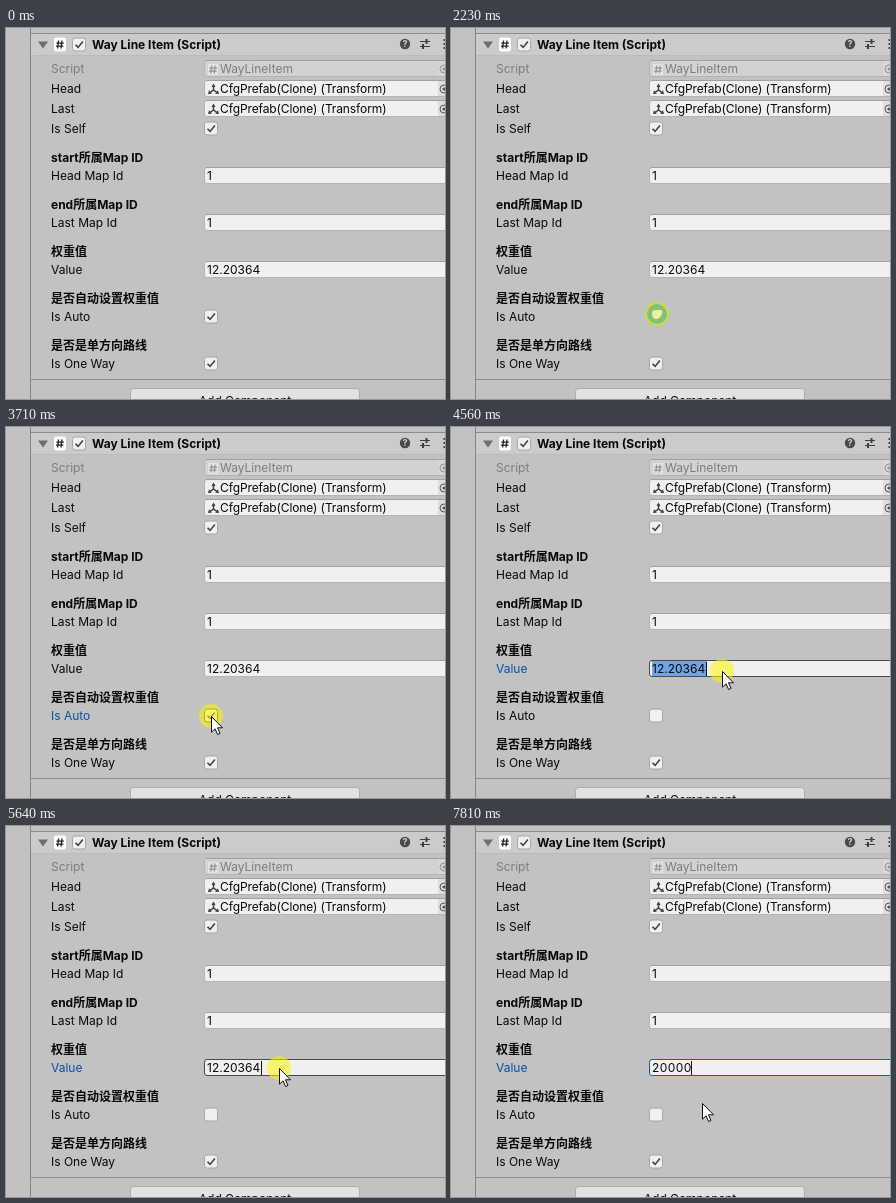
These frames come from a looping animation (439x371 px, 8000 ms). An HTML page:

```html
<!DOCTYPE html>
<html lang="en">
<head>
<meta charset="utf-8">
<title>Inspector</title>
<style>
html, body { margin: 0; width: 100%; height: 100%; overflow: hidden; background: #c2c2c2; }
svg { display: block; }
text { font: 12px Inter, "Noto Sans CJK SC", "Noto Sans CJK", sans-serif; fill: #090909; white-space: pre; }
.bold { font-weight: 700; }
.dim { fill: #7d7d7d; }
.focus { fill: #0b4ea2; }
.tight { letter-spacing: -.11px; }
</style>
</head>
<body>
<svg id="stage" width="439" height="371" viewBox="0 0 439 371"></svg>
<script>
const LOOP = 8000;
const stage = document.getElementById('stage');

function add(tag, attrs, text) {
  const el = document.createElementNS('http://www.w3.org/2000/svg', tag);
  for (const key in attrs) el.setAttribute(key, attrs[key]);
  if (text !== undefined) el.textContent = text;
  stage.appendChild(el);
  return el;
}
const rect = (x, y, width, height, fill, more) => add('rect', { x, y, width, height, fill, ...more });
const label = (x, y, text, cls = '') => add('text', { x, y, class: cls }, text);
const path = (d, more) => add('path', { d, fill: 'none', stroke: '#404040', ...more });
const show = (el, on) => el.setAttribute('display', on ? 'inline' : 'none');

function checkbox(x, y) {
  const box = rect(x + .5, y + .5, 13, 13, '#f0f0f0', { stroke: '#a6a6a6', rx: 2.5 });
  const mark = path(`M${x + 3.5} ${y + 7.2}l2.6 2.7l4.8 -5.9`, { 'stroke-width': 1.6 });
  return { box, mark };
}

function field(cy, fill = '#f0f0f0') {
  const box = rect(198.5, cy - 8.5, 250, 16, fill, { stroke: '#b4b4b4', rx: 2.5 });
  const edge = path(`M200 ${cy - 8.5}H439`, { stroke: '#a0a0a0' });
  return { box, edge };
}

function picker(cy, opacity) {
  rect(432, cy - 8, 7, 15, '#dedede', { opacity });
  add('circle', { cx: 438, cy, r: 4, fill: 'none', stroke: '#555', opacity });
  add('circle', { cx: 438, cy, r: 1.6, fill: '#555', opacity });
}

function hash(x, y, color, width) {
  path(`M${x + 2.6} ${y}l-1 8M${x + 6} ${y}l-1 8M${x + .4} ${y + 2.6}h7.4M${x} ${y + 5.6}h7.4`, { stroke: color, 'stroke-width': width });
}

// Panel
rect(0, 0, 439, 371, '#c2c2c2');
rect(25, 6, 414, 21, '#cbcbcb');
rect(25, 27, 414, 1, '#bbbbbb');
rect(25, 5, 414, 1, '#8c8c8c');
rect(25, 351, 414, 1, '#8c8c8c');
rect(24, 0, 1, 371, '#858585');

// Header
path('M32 13.5h10l-5 7z', { fill: '#6e6e6e', stroke: 'none' });
rect(48, 9.5, 12, 14, '#fcfcfc', { rx: 2 });
hash(50, 12.5, '#222', 1.3);
checkbox(66, 9.5);
label(86, 21, 'Way Line Item (Script)', 'bold');
add('circle', { cx: 399, cy: 16, r: 5.2, fill: '#4a4a4a' });
add('text', { x: 399, y: 19.4, 'text-anchor': 'middle', style: 'font-size:9px;font-weight:700;fill:#d5d5d5' }, '?');
path('M414 13.5h10M414 18.5h10', { 'stroke-width': 1.2 });
path('M420.5 11v5M417 16v5', { 'stroke-width': 2 });
for (const y of [12, 16, 20]) rect(437.5, y - 1, 2, 2, '#444');

// Rows
label(45, 45, 'Script', 'dim');
field(41, '#d2d2d2');
rect(202, 36, 10, 11, '#e4e4e4', { rx: 1 });
hash(203.2, 37.5, '#909090', 1.1);
label(214, 45, 'WayLineItem', 'dim');
picker(41, .5);

[['Head', 61], ['Last', 81]].forEach(([name, y]) => {
  label(45, y + 4, name);
  field(y);
  path(`M207.5 ${y + 1}v-5M207.5 ${y + 1}l-3.6 2.6M207.5 ${y + 1}l3.6 2.6`, { 'stroke-width': 1.5 });
  path(`M205.5 ${y - 2}l2 -3.5l2 3.5zM202 ${y + 5}l1 -3.8l2.8 3.6zM213 ${y + 5}l-1 -3.8l-2.8 3.6z`, { fill: '#404040', stroke: 'none' });
  label(214, y + 4, 'CfgPrefab(Clone) (Transform)', 'tight');
  picker(y, 1);
});

label(45, 105, 'Is Self');
checkbox(198, 93.5);

[['start所属Map ID', 134], ['end所属Map ID', 181], ['权重值', 228],
 ['是否自动设置权重值', 275], ['是否是单方向路线', 322]].forEach(([name, y]) => label(45, y, name, 'bold'));

[['Head Map Id', 148], ['Last Map Id', 195]].forEach(([name, y]) => {
  label(45, y + 4, name);
  field(y);
  label(201, y + 4, '1');
});

const valueLabel = label(45, 246, 'Value');
const valueField = field(242);
const selection = rect(201, 234, 55, 15, '#72a3e3');
const valueText = label(201, 246, '12.20364');
const caret = rect(255, 235, 1, 14, '#111');

const autoLabel = label(45, 293, 'Is Auto');
const auto = checkbox(198, 281.5);
label(45, 340, 'Is One Way');
checkbox(198, 328.5);

rect(124.5, 360.5, 229, 24, '#e2e2e2', { stroke: '#acacac', rx: 3 });
add('text', { x: 239, y: 377, 'text-anchor': 'middle' }, 'Add Component');

// Pointer layers
const flash = [
  add('circle', { cx: 206, cy: 286, r: 11, fill: '#82c07c', stroke: '#cfdc45', 'stroke-width': 2 }),
  path('M201 285q0 -3 4 -3h5q2 1 1 4q-2 5 -6 5q-4 0 -4 -6z', { fill: '#eef0a0', stroke: 'none' })
];
const halo = add('circle', { r: 12, fill: '#fff500', opacity: .55 });
const arrow = path('M.5 .5V16.2L4.1 12.8L6.6 18.5L9 17.4L6.5 11.8H11.5Z',
  { fill: '#fff', stroke: '#111', 'stroke-width': 1, 'stroke-linejoin': 'round' });

// Pointer legs: start, end, steps, x, y, optional bend x, y
const legs = [
  [130, 670, 8, 198, 278, 210, 220],
  [840, 1000, 3, 208, 286],
  [1310, 1370, 2, 206, 286],
  [2380, 2930, 8, 206, 289, 242, 232],
  [3330, 3330, 1, 205, 289],
  [4080, 4480, 6, 271, 244],
  [4640, 4710, 2, 161, 240],
  [4860, 4860, 1, 167, 244],
  [5030, 5330, 5, 260, 251, 220, 224],
  [5500, 5570, 2, 273, 242],
  [5720, 5790, 2, 145, 242],
  [6270, 6650, 6, 251, 277, 105, 230]
];
const keyTimes = [7110, 7340, 7510, 7730, 7810];

function pointer(t) {
  let x = 348, y = 375;
  for (const [from, to, steps, ex, ey, bx = (x + ex) / 2, by = (y + ey) / 2] of legs) {
    if (t < from) break;
    const gap = steps > 1 ? (to - from) / (steps - 1) : 1;
    const u = Math.min(1, (Math.floor((t - from) / gap + 1e-6) + 1) / steps);
    const v = 1 - u;
    x = v * v * x + 2 * u * v * bx + u * u * ex;
    y = v * v * y + 2 * u * v * by + u * u * ey;
  }
  return [Math.round(x), Math.round(y)];
}

const within = (t, a, b) => t >= a && t < b;

function render(t) {
  const [x, y] = pointer(t);
  const flashing = within(t, 2230, 2380);
  const pressed = within(t, 3710, 3850);
  flash.forEach(el => show(el, flashing));
  show(arrow, t >= 130 && !flashing);
  arrow.setAttribute('transform', `translate(${x} ${y})`);
  show(halo, pressed || within(t, 4560, 4710) || within(t, 5570, 6040));
  halo.setAttribute('cx', x);
  halo.setAttribute('cy', y);

  show(auto.mark, t < 3770);
  auto.box.setAttribute('stroke', pressed ? '#4a4a4a' : '#a6a6a6');
  autoLabel.setAttribute('class', within(t, 3710, 4560) ? 'focus' : '');
  valueLabel.setAttribute('class', t >= 4560 ? 'focus' : '');

  const edge = t < 4560 ? null : t < 5720 ? '#4a4a4a' : '#1d5cab';
  valueField.box.setAttribute('stroke', edge || '#b4b4b4');
  valueField.edge.setAttribute('stroke', edge || '#a0a0a0');

  const typed = keyTimes.filter(k => t >= k).length;
  valueText.textContent = typed ? '20000'.slice(0, typed) : '12.20364';
  valueText.style.letterSpacing = typed ? '.45px' : '0';

  const left = within(t, 5720, 5790) ? Math.max(201, x) : 201;
  selection.setAttribute('x', left);
  selection.setAttribute('width', 256 - left);
  show(selection, within(t, 4560, 4860) || within(t, 5720, 7110));
  show(caret, within(t, 4560, 5720) || typed > 0);
  caret.setAttribute('x', typed ? 200 + 8 * typed : 255);
}

const start = performance.now();
function tick() {
  render((performance.now() - start) % LOOP);
  requestAnimationFrame(tick);
}
render(0);
requestAnimationFrame(tick);
</script>
</body>
</html>
```
